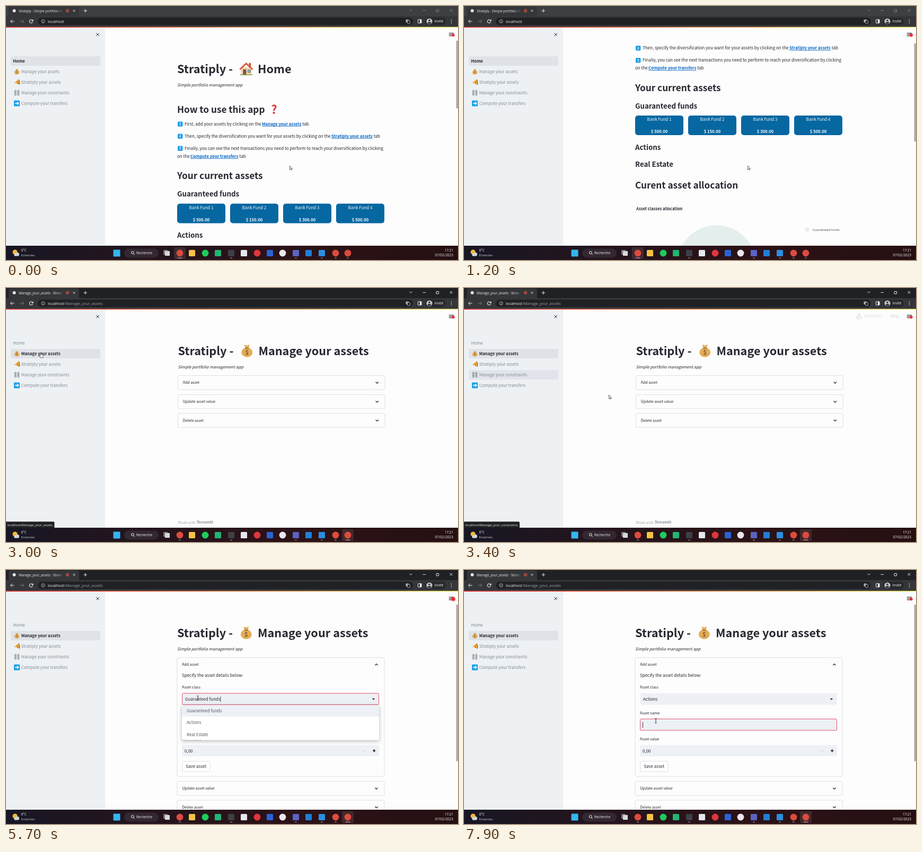
Recreate the animation shown at these times as an HTML page with a canvas. Size 853x480 px, loop 8000 ms.

```html
<!DOCTYPE html>
<html lang="en">
<head>
<meta charset="utf-8">
<title>Portfolio app</title>
<style>
html, body { margin: 0; width: 100%; height: 100%; overflow: hidden; background: #fdfdfd; }
canvas { display: block; width: 853px; height: 480px; }
</style>
</head>
<body>
<canvas id="stage" width="853" height="480"></canvas>
<script>
const g = document.getElementById('stage').getContext('2d');
const PAGE = '"Noto Sans CJK JP","Noto Sans CJK SC","Noto Sans CJK",sans-serif';
const UI = '"Open Sans","Noto Sans",sans-serif';
const APP = 'Stratiply';
const INK = '#262730', BLUE = '#1ba0e8', PINK = '#e2506f', FIELD = '#edf0f4';
const BODY = 7.97, SMALL = 6.97, H1 = 21.7, H2 = 17.2, H3 = 13.3;
const LOOP = 8000, NAV = 2900, EXPAND = 4400, OPEN = 5500, PICK = 6500, NAME = 7500;

const clamp = v => Math.max(0, Math.min(1, v));
const smooth = v => (v = clamp(v), v * v * (3 - 2 * v));

// y is the visual middle of the capitals
function text(s, x, y, size, color = INK, style = '', font = PAGE, align = 'left') {
  g.font = `${style} ${size}px ${font}`;
  g.textAlign = align;
  g.fillStyle = color;
  g.fillText(s, x, y + size * .366);
}
const ui = (s, x, y, size, color, align) => text(s, x, y, size, color, '', UI, align);

function box(x, y, w, h, r, fill, stroke) {
  g.beginPath();
  g.roundRect(x, y, w, h, r);
  if (fill) { g.fillStyle = fill; g.fill(); }
  if (stroke) { g.strokeStyle = stroke; g.lineWidth = 1; g.stroke(); }
}
function disc(x, y, r, fill, stroke, width = 1) {
  g.beginPath();
  g.arc(x, y, r, 0, 7);
  if (fill) { g.fillStyle = fill; g.fill(); }
  if (stroke) { g.strokeStyle = stroke; g.lineWidth = width; g.stroke(); }
}
function trace(p) {
  g.beginPath();
  for (let i = 0; i < p.length; i += 2) g.lineTo(p[i], p[i + 1]);
}
function line(p, color, width = 1) {
  trace(p);
  g.strokeStyle = color; g.lineWidth = width; g.stroke();
}
function poly(p, fill, stroke) {
  trace(p);
  g.closePath();
  g.fillStyle = fill; g.fill();
  if (stroke) { g.strokeStyle = stroke; g.lineWidth = .7; g.stroke(); }
}
function at(x, y, scale, draw) {
  g.save();
  g.translate(x, y);
  g.scale(scale, scale);
  draw();
  g.restore();
}
function cross(x, y, r, color, width) {
  line([x - r, y - r, x + r, y + r], color, width);
  line([x - r, y + r, x + r, y - r], color, width);
}
function chevron(x, y, dir, color, width = 1.3) {
  line([x - 2.6, y - 1.3 * dir, x, y + 1.3 * dir, x + 2.6, y - 1.3 * dir], color, width);
}

// Small pictures, each within about -12..12
const house = () => {
  box(-10, -3, 20, 15, 0, '#ecd6b4');
  box(5, -11, 4, 8, 0, '#b9653f');
  poly([-13, 0, 0, -12, 13, 0, 11, 2, 0, -8, -11, 2], '#d9583b');
  box(-6, 1, 6, 11, 0, '#8a5136');
  box(3, 2, 5, 5, 0, '#6fb5d6', '#a8754e');
  box(-12, 10.5, 24, 1.5, 0, '#7fa650');
};
const bag = () => {
  poly([-5, -12, 0, -10, 5, -12, 3, -5, -3, -5], '#e3ac58');
  g.beginPath();
  g.ellipse(0, 3, 10.5, 9, 0, 0, 7);
  g.fillStyle = '#e3ac58'; g.fill();
  box(-4, -6, 8, 2, 1, '#a8733a');
  text('$', 0, 3.5, 11, '#7c542a', 'bold', PAGE, 'center');
};
const pizza = () => {
  poly([-11, 2, 7, -11, 10, 9], '#f3b53e');
  line([7, -11, 11, -1, 10, 10], '#b8702d', 4);
  disc(2, -2, 2.5, '#d2452f');
  disc(4, 5, 2.5, '#d2452f');
};
const chains = () => {
  for (const x of [-6, 6]) for (const y of [-7, 0, 7]) {
    box(x - 3, y - 4, 6, 8, 3);
    g.strokeStyle = '#5d656c'; g.lineWidth = 1.8; g.stroke();
  }
};
const arrowTile = () => {
  box(-12, -12, 24, 24, 3, BLUE);
  line([-7, 0, 6, 0], '#fff', 4);
  line([1, -6, 7, 0, 1, 6], '#fff', 3);
};

const mouseKeys = [
  [0, 535.5, 302], [1500, 535.5, 302], [2100, 80, 148], [2300, 70, 141], [2600, 66, 122], [3000, 66, 122],
  [3200, 72, 163], [3300, 110, 166], [3400, 273.5, 202], [3700, 273.5, 202], [4200, 356, 187],
  [4600, 356, 187], [5200, 362, 242], [5900, 362, 242], [6300, 362, 285], [8000, 362, 285]];
function mouseAt(t) {
  const i = Math.max(1, mouseKeys.findIndex(k => k[0] >= t));
  const [a, ax, ay] = mouseKeys[i - 1], [b, bx, by] = mouseKeys[i];
  const p = smooth((t - a) / (b - a));
  return [ax + (bx - ax) * p, ay + (by - ay) * p];
}
const scrollAt = t => [400, 716, 1000, 1250].reduce((s, n) => s + 55.5 * smooth((t - n) / 200), 0);

const rows = [
  ['Home'], ['Manage your assets', bag], [APP + ' your assets', pizza],
  ['Manage your constraints', chains], ['Compute your transfers', arrowTile]];
const rowUnder = ([x, y]) => x > 9 && x < 178 ? rows.findIndex((r, i) => Math.abs(y - 104 - 20 * i) < 9.5) : -1;

function browser(t) {
  // the window is unfocused until the first click
  const nav = t >= NAV, bright = nav ? '#f2f2f2' : '#85878a';
  box(0, 0, 853, 19, 0, nav ? '#202124' : '#3c4043');
  box(5, 1, 133, 24, 4, '#35363a');
  box(0, 19, 853, 21, 0, '#35363a');
  disc(15.5, 9, 3, '#e8e8e8');
  g.save();
  g.beginPath(); g.rect(20, 0, 88, 19); g.clip();
  const fade = g.createLinearGradient(95, 0, 108, 0);
  fade.addColorStop(0, '#e8eaed');
  fade.addColorStop(1, '#35363a');
  ui(nav ? 'Manage_your_assets · Streamlit' : APP + ' - Simple portfolio manager', 24, 9.3, 6.2, fade);
  g.restore();
  disc(116, 9, 2.9, null, '#d9523f', .9);
  disc(116, 9, 1.6, '#d9523f');
  cross(128.5, 9, 2, '#dfe1e5', .9);
  line([146.5, 9, 153, 9], '#e8eaed');
  line([149.8, 5.8, 149.8, 12.2], '#e8eaed');
  chevron(764, 8, 1, bright, .9);
  line([786.5, 8.5, 792, 8.5], bright, .9);
  box(812, 6.5, 4.5, 4.5, .5, null, bright);
  cross(840, 8.3, 2.4, bright, .9);

  for (const [x, d, c] of [[12, 1, '#e8eaed'], [30, -1, '#76787c']]) {
    line([x - 3.5, 29, x + 3.5, 29], c);
    line([x - .3 * d, 25.7, x - 3.5 * d, 29, x - .3 * d, 32.3], c);
  }
  g.beginPath();
  g.arc(47.5, 29, 3.1, .4, 5.6);
  g.strokeStyle = '#e8eaed'; g.lineWidth = 1.1; g.stroke();
  poly([51.5, 25, 51.5, 28.7, 47.8, 28.7], '#e8eaed');
  box(60, 22, 708, 14, 7, '#202124');
  disc(70, 29, 3.2, null, '#c4c7ca', .8);
  line([70, 28.6, 70, 31], '#c4c7ca', .9);
  line([70, 26.8, 70, 27.7], '#c4c7ca', .9);
  ui('localhost', 79, 29, 7.3, '#f1f3f4');
  if (nav) {
    const x = 79 + g.measureText('localhost').width;
    ui('/Manage_your_assets', x, 29, 7.3, '#9aa0a6');
  }
  box(754.5, 25.5, 5.5, 5.5, 1, '#a9acb0');
  box(757.5, 27.5, 5, 5.5, 1, '#202124', '#a9acb0');
  box(777.5, 25.7, 6.5, 6.5, .5, null, '#f1f3f4');
  box(781, 26, 3, 6, 0, '#f1f3f4');
  box(791, 22, 39, 14, 7, '#27282b');
  disc(799, 29, 5.6, '#c3c6ca');
  disc(799, 27.2, 1.8, '#35363a');
  g.beginPath(); g.ellipse(799, 32, 3.4, 1.9, 0, 0, 7); g.fillStyle = '#35363a'; g.fill();
  ui('Invité', 808.5, 29, 6.6, '#f1f3f4');
  for (const y of [26, 29, 32]) disc(840.5, y, .8, '#e8eaed');
}

function sidebar(t) {
  box(0, 40, 187, 413, 0, '#edf1f4');
  cross(173, 54, 2.7, INK, 1);
  const active = t >= NAV ? 1 : 0, hover = rowUnder(mouseAt(Math.max(0, t - 100)));
  rows.forEach(([name, icon], i) => {
    const y = 104 + 20 * i, on = i === active;
    if (on || i === hover) box(9, y - 9, 169, 18, 2, on ? '#dfe3e8' : '#e1e4ea');
    if (icon) at(20.5, y, .46, icon);
    text(name, icon ? 28.7 : 13.3, y, on ? 7.7 : BODY, on ? INK : '#858a92', on ? 'bold' : '');
  });
}

function link(s, x, y) {
  text(s, x, y, 7.75, '#0a66c2', 'bold');
  const w = g.measureText(s).width;
  line([x, y + 4.2, x + w, y + 4.2], '#0a66c2', .9);
}

function title(draw, name) {
  text(APP + ' -', 323, 119, H1, INK, 'bold');
  at(453.3, 118.7, 1, draw);
  text(name, 475, 119, H1, INK, 'bold');
  text('Simple portfolio management app', 323, 149.5, 7.7, INK, 'italic');
}

function homePage(t) {
  const scroll = scrollAt(t);
  g.save();
  g.beginPath(); g.rect(187, 65, 662, 388); g.clip();
  g.translate(0, -scroll);
  title(house, 'Home');
  const h2 = (s, y) => text(s, 323, y, H2, INK, 'bold');
  const h3 = (s, y) => text(s, 323, y, H3, INK, 'bold');
  h2('How to use this app', 195.5);
  text('?', 506, 195.5, 22, '#d8343f', '900', PAGE, 'center');
  [223, 246, 269].forEach((y, i) => {
    box(324, y - 4.6, 9.4, 9.4, 1.5, BLUE);
    text(i + 1, 328.7, y, 6.6, '#fff', 'bold', PAGE, 'center');
  });
  const p = (s, x, y) => text(s, x, y, BODY);
  p('First, add your assets by clicking on the', 337, 223);
  link('Manage your assets', 483, 223);
  p('tab', 559.3, 223);
  p('Then, specify the diversification you want for your assets by clicking on the', 337, 246);
  link(APP + ' your assets', 614, 246);
  p('tab', 693.7, 246);
  p('Finally, you can see the next transactions you need to perform to reach your diversification by clicking', 337, 269);
  p('on the', 323, 284);
  link('Compute your transfers', 348, 284);
  p('tab', 440.3, 284);
  h2('Your current assets', 321);
  h3('Guaranteed funds', 355.5);
  [500, 150, 300, 500].forEach((v, i) => {
    const x = 323 + 100 * i;
    box(x, 373.5, 91, 37, 5, '#0667a1');
    text('Bank Fund ' + (i + 1), x + 45.5, 380.7, BODY, '#f4f8fb', '', PAGE, 'center');
    text(`$ ${v}.00`, x + 45.5, 404, 7.75, '#fff', 'bold', PAGE, 'center');
  });
  h3('Actions', 433.5);
  h3('Real Estate', 466);
  h2('Curent asset allocation', 505);
  text('Asset classes allocation', 325, 550, 7.6, INK, 'bold');
  disc(476.5, 656, 75, '#e4eeec');
  ui('100%', 476.5, 656, 6.4, '#444', 'center');
  box(644, 585.5, 7, 7, 0, '#e4eeec');
  ui('Guaranteed funds', 658, 589, 6, '#3b3f46');
  g.restore();
  if (mouseAt(t)[0] > 187) box(849.5, 65.5 + .03 * scroll, 3.5, 128 + .347 * scroll, 1, '#a9abae');
}

function assetsPage(t) {
  const grow = clamp((t - EXPAND) / 250), full = grow === 1;
  const bottom = 192 + 198 * grow, [mx, my] = mouseAt(t);
  const hot = mx > 324 && my > 165 && my < 200;
  g.save();
  g.beginPath(); g.rect(187, 41, 666, 412); g.clip();
  if (!full) {
    text('Made with', 324.3, 443, SMALL, '#a3a8b4');
    text('Streamlit', 360, 443, 6.8, '#858a95', 'bold');
  }
  // the scrollbar nudges the centred column to the left
  g.translate(full ? 0 : 1.4, 0);
  title(bag, 'Manage your assets');
  [['Add asset', 165.5, bottom], ['Update asset value', bottom + 9.5, bottom + 36], ['Delete asset', bottom + 45, bottom + 71.5]]
    .forEach(([name, top, end], i) => {
      const c = !i && hot ? PINK : INK;
      box(323, top, 391, end - top, 2, null, '#dcdfe5');
      text(name, 332.3, top + 13.3, SMALL, c);
      chevron(699, top + 13.3, !i && grow ? -1 : 1, c);
    });
  if (full) form(t);
  g.restore();
  if (full) box(849.5, 65.5, 3.5, 296, 1, '#a9abae');

  const run = clamp((t - 3200) / 300) * clamp((4000 - t) / 200);
  if (run) {
    g.globalAlpha = run * .5;
    disc(746, 49.5, 1.3, '#777b84');
    line([746, 51, 745.5, 54, 748.5, 54.5, 749.5, 58], '#777b84', 1.2);
    g.beginPath(); g.arc(744.5, 55.5, 3, 1, 4.6); g.stroke();
    text('RUNNING...', 756, 53.5, SMALL, '#9a9da5');
    text('Stop', 804.5, 53.5, 7.7, '#777b84');
    g.globalAlpha = 1;
  }
}

function form(t) {
  const open = t >= OPEN && t < PICK, onSelect = t >= OPEN && t < NAME, onName = t >= NAME;
  const value = t < PICK ? 'Guaranteed funds' : 'Actions';
  const label = (s, y) => text(s, 332, y, SMALL);
  text('Specify the asset details below:', 332, 198.7, BODY);
  label('Asset class', 221.3);
  label('Asset name', 270.3);
  label('Asset value', 319.3);
  box(332.5, 233, 371, 21.5, 2, FIELD, onSelect ? PINK : null);
  text(value, 338, 243.8, BODY);
  if (open && t % 1000 >= 500) {
    const x = 338.5 + g.measureText(value).width;
    line([x, 239, x, 249], INK, .8);
  }
  poly([690.8, 242.7, 696.2, 242.7, 693.5, 245.5], '#111');
  box(332.5, 281.5, 371, 21.5, 2, FIELD, onName ? PINK : null);
  if (onName) line([337.5, 287.5, 337.5, 298.5], INK, .9);
  box(332, 331, 372, 21, 2, FIELD);
  text('0,00', 337, 341.6, BODY);
  line([674, 341.5, 679, 341.5], '#c9cdd4', 1.1);
  line([692, 341.5, 697.4, 341.5], '#111', 1.4);
  line([694.7, 338.8, 694.7, 344.2], '#111', 1.4);
  box(332.5, 361.5, 52.5, 19.5, 2, '#fff', '#dcdfe5');
  text('Save asset', 358.7, 371.3, BODY, INK, '', PAGE, 'center');
  if (!open) return;
  g.save();
  g.shadowColor = 'rgba(0,0,0,.28)'; g.shadowBlur = 7; g.shadowOffsetY = 2;
  box(332, 255, 372, 66.5, 2, '#fff');
  g.restore();
  const pick = mouseAt(t)[1] > 277 ? 1 : 0;
  box(332, 255 + 22 * pick, 372, 22, 0, FIELD);
  ['Guaranteed funds', 'Actions', 'Real Estate'].forEach((s, i) => text(s, 341, 266.3 + 22.2 * i, BODY, '#555862'));
}

function header(t) {
  const rainbow = g.createLinearGradient(0, 0, 853, 0);
  rainbow.addColorStop(0, '#ff4b4b');
  rainbow.addColorStop(1, '#fffd80');
  box(0, 39.4, 853, 1.6, 0, rainbow);
  for (const y of [51.3, 53.8, 56.3]) line([835.8, y, 845, y], INK, 1.1);
  const pulse = (1 - Math.cos(t / 1600 * Math.PI * 2)) / 2;
  disc(844, 55, 3 + 2.2 * pulse, `rgba(255,43,43,${.35 * pulse})`);
  disc(844, 55, 2.7 + .5 * pulse, '#f2262e');
}

function status(t) {
  const a = clamp((t - 2200) / 300) * clamp((3700 - t) / 200);
  if (!a) return;
  const i = rowUnder(mouseAt(t - 100)), name = rows[i > 0 ? i : 3][0];
  const s = 'localhost/' + name.replaceAll(' ', '_');
  g.globalAlpha = a;
  g.font = `6px ${UI}`;
  g.textAlign = 'left';
  box(-2, 441.5, g.measureText(s).width + 8, 14, 2, '#202124');
  ui(s, 2.5, 447.5, 6, '#e8eaed');
  g.globalAlpha = 1;
}

// [x, colour, round, running]
const apps = [
  [328, '#dd4b3e', 1, 1], [351, '#f5c344', 0, 0], [376, '#1fcb5c', 1, 0], [400, '#22b573', 0, 0],
  [425, '#3d4046', 0, 1], [449, '#e4e8ee', 0, 0], [474, '#e0363c', 1, 0], [498, '#2a62d6', 0, 0],
  [522, '#ece6ee', 1, 0], [547, '#5b62c4', 0, 1], [571, '#1f7fd6', 0, 0], [596, '#2a8fe0', 0, 1],
  [622, '#dd4b3e', 1, 1], [645, '#dd4b3e', 1, 1]];

function taskbar(t) {
  const bg = g.createLinearGradient(0, 0, 853, 0);
  ['#181723', '#25141d', '#2b1216', '#261012'].forEach((c, i) => bg.addColorStop(i / 3, c));
  box(0, 453, 853, 27, 0, bg);
  disc(17, 465, 4.6, '#f4b63a');
  disc(18, 470, 2.8, '#cfd6de');
  disc(21.5, 469.3, 3.5, '#cfd6de');
  ui('6°C', 28.5, 462, 6.3, '#f3f3f5');
  ui('Eclaircies', 28.5, 471, 6, '#d4d4d8');
  box(202.5, 460.5, 13, 13, 1, '#35b5f0');
  box(223, 458.5, 65, 17, 8.5, '#332832');
  disc(238.8, 466, 2.4, null, '#f3f3f5');
  line([240.5, 467.8, 242.8, 470.2], '#f3f3f5');
  ui('Recherche', 246, 467, 6.2, '#f3f3f5');
  box(297, 461, 8, 9, .5, '#77757b');
  box(300, 463, 9, 9, .5, '#d9d9dc');
  const active = t >= NAV ? 645 : 328;
  for (const [x, c, round, running] of apps) {
    const on = x === active;
    if (on) box(x - 11, 456, 22, 22, 2, 'rgba(255,255,255,.1)');
    if (round) disc(x, 467, 6.4, c);
    else box(x - 6, 461, 12, 12, 1.5, c);
    if (running) box(x - (on ? 4.5 : 2), 475.7, on ? 9 : 4, 1.4, .7, on ? '#e58ba6' : '#9a9298');
  }
  ui('17:21', 844, 462, 6.3, '#f3f3f5', 'right');
  ui('07/02/2023', 844, 471, 6.5, '#f3f3f5', 'right');
}

const arrow = () => poly([0, 0, 0, 7.2, 1.7, 5.7, 2.8, 8.2, 3.9, 7.7, 2.8, 5.3, 5, 5.3], '#fff', '#222');
const hand = () => poly([-.7, 0, .7, 0, .9, 3.6, 4, 4.3, 4.3, 7, 3.4, 9.8, -1, 9.8, -3.4, 6, -2.5, 5.4, -.9, 6.6], '#fff', '#222');
const beam = () => {
  line([0, -4, 0, 4], '#222', .9);
  for (const y of [-4, 4]) line([-1.6, y, 1.6, y], '#222', .9);
};
function cursor(t) {
  const m = mouseAt(t), [x, y] = m;
  let shape = arrow;
  if (rowUnder(m) >= 0) shape = hand;
  else if (t >= NAV && x > 324) {
    if (y < 200) shape = hand;
    else if (t > EXPAND && y > 232) shape = y > 256 && t < PICK ? hand : beam;
  }
  at(x, y, 1, shape);
}

const start = performance.now();
function frame() {
  const t = Math.floor((performance.now() - start) % LOOP / 100) * 100;
  box(0, 0, 853, 480, 0, '#fdfdfd');
  (t < NAV ? homePage : assetsPage)(t);
  sidebar(t);
  browser(t);
  header(t);
  status(t);
  taskbar(t);
  cursor(t);
  requestAnimationFrame(frame);
}
frame();
</script>
</body>
</html>
```
